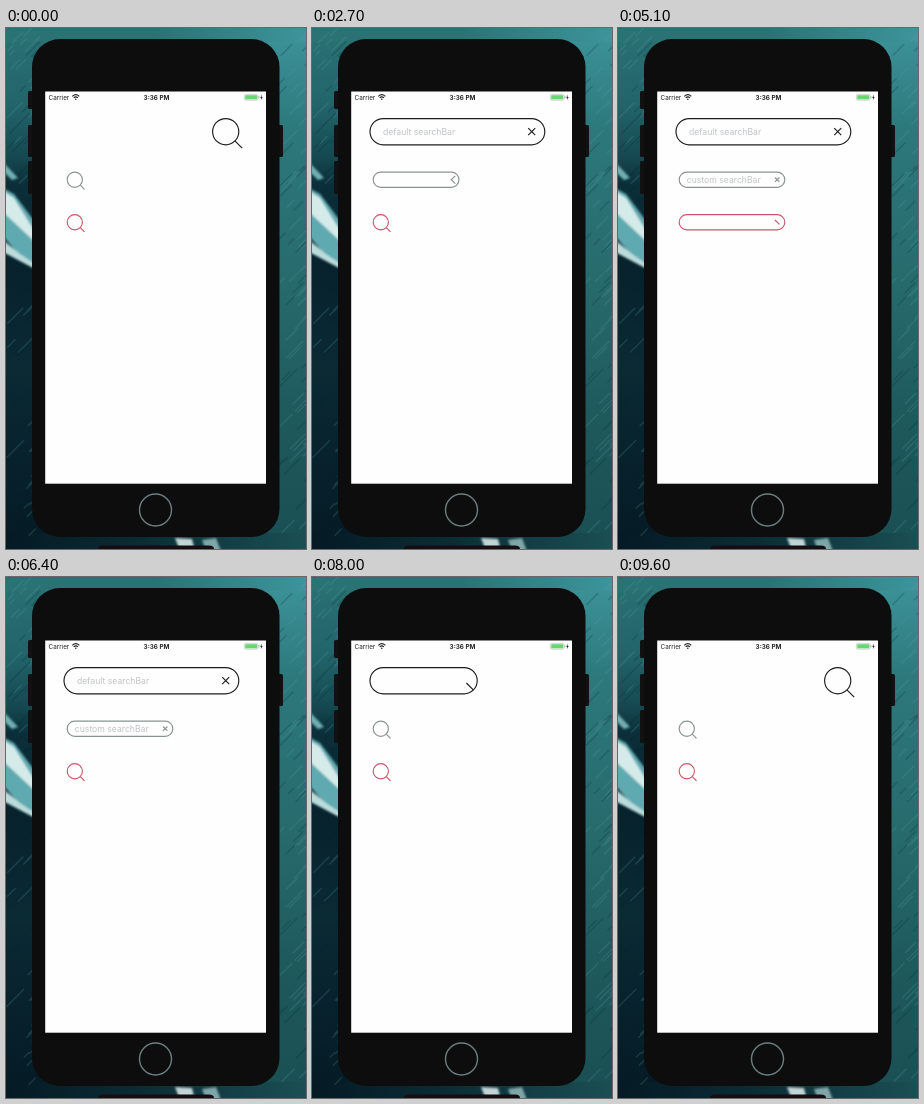
These frames come from a looping animation (300x521 px, 9.7 s). An HTML page:

```html
<!DOCTYPE html>
<html lang="en">
<head>
<meta charset="utf-8">
<title>Expanding search bars</title>
<style>
  html, body { margin: 0; width: 100%; height: 100%; overflow: hidden; background: #0d0d0d; }
  svg { display: block; width: 300px; height: 521px; }
  text { font-family: Inter, "Liberation Sans", sans-serif; }
  .status { font-size: 6.3px; fill: #222; }
  .hint { font-size: 8.65px; fill: #bfc2c5; }
</style>
</head>
<body>
<svg id="stage" viewBox="0 0 300 521">
  <defs>
    <linearGradient id="left" x2="0" y2="1">
      <stop offset="0" stop-color="#2a7274"/>
      <stop offset=".15" stop-color="#22646a"/>
      <stop offset=".25" stop-color="#154850"/>
      <stop offset=".3" stop-color="#0b2f3a"/>
      <stop offset=".46" stop-color="#07222d"/>
      <stop offset=".65" stop-color="#0a2a34"/>
      <stop offset="1" stop-color="#051a25"/>
    </linearGradient>
    <linearGradient id="right" x2="0" y2="1">
      <stop offset="0" stop-color="#3d949b"/>
      <stop offset=".2" stop-color="#2c787b"/>
      <stop offset=".5" stop-color="#276a6c"/>
      <stop offset=".75" stop-color="#1e595c"/>
      <stop offset="1" stop-color="#1a4f54"/>
    </linearGradient>
    <linearGradient id="top">
      <stop offset="0" stop-color="#2a7274"/>
      <stop offset=".5" stop-color="#2a7375"/>
      <stop offset="1" stop-color="#3d949b"/>
    </linearGradient>
    <linearGradient id="bottom">
      <stop offset="0" stop-color="#051a25"/>
      <stop offset=".45" stop-color="#0b2c35"/>
      <stop offset="1" stop-color="#1a4f54"/>
    </linearGradient>
    <filter id="soft"><feGaussianBlur stdDeviation="1.2"/></filter>
  </defs>

  <rect width="150" height="521" fill="url(#left)"/>
  <rect x="150" width="150" height="521" fill="url(#right)"/>
  <rect width="300" height="14" fill="url(#top)"/>
  <rect y="505" width="300" height="16" fill="url(#bottom)"/>
  <g id="streaks" stroke-width="1.4" opacity=".22"></g>
  <g filter="url(#soft)">
    <path d="M-3 134L12 150L6 152L-3 143Z" fill="#6fb0b4"/>
    <path d="M-3 160L8 166L29 194V240L14 228L-3 208Z" fill="#5fa9b0"/>
    <path d="M-3 163L8 170L29 204V214L-3 184Z" fill="#d5ebea"/>
    <path d="M-3 212L14 226L29 236V241L-3 224Z" fill="#bcdcdc"/>
    <path d="M169 510L186 511L189 523H174Z" fill="#c2d4d5"/>
    <path d="M196 512L210 510L215 523H200Z" fill="#7fa5a8"/>
  </g>
  <path d="M92 521Q92 517.5 97 517.5H203Q208 517.5 208 521Z" fill="#150d10"/>

  <g fill="#111">
    <rect x="22" y="63" width="6" height="18" rx="1.5"/>
    <rect x="22" y="97" width="6" height="32" rx="1.5"/>
    <rect x="22" y="133" width="6" height="33" rx="1.5"/>
    <rect x="271" y="97" width="6" height="32" rx="1.5"/>
  </g>
  <rect x="26" y="11" width="247.5" height="498" rx="28" fill="#0d0d0d"/>
  <rect x="39.2" y="63.5" width="220.8" height="392.2" fill="#fefefe"/>
  <circle cx="149.5" cy="482" r="16" fill="none" stroke="#6c7f80" stroke-width="1.4"/>

  <text class="status" x="42.6" y="71.6">Carrier</text>
  <g fill="none" stroke="#222" stroke-width="1.1">
    <path d="M66.3 68.3Q69.8 65 73.3 68.3"/>
    <path d="M67.7 69.9Q69.8 67.9 71.9 69.9"/>
  </g>
  <circle cx="69.8" cy="71.2" r=".8" fill="#222"/>
  <text class="status" x="150.5" y="71.6" text-anchor="middle" font-weight="700">3:36 PM</text>
  <rect x="238.4" y="66.4" width="13.6" height="5.8" rx="1.4" fill="#eef6ee" stroke="#b4bdb4" stroke-width=".6"/>
  <rect x="239.3" y="67.3" width="11.8" height="4" rx=".6" fill="#62d86f"/>
  <path d="M252.9 68.2V70.4" stroke="#999" stroke-width=".8"/>
  <path d="M256 66.5L254.2 69.7H255.3L254.8 72.2L256.7 68.9H255.5Z" fill="#222"/>
</svg>
<script>
const LOOP = 9700;
const NS = "http://www.w3.org/2000/svg";
const stage = document.getElementById("stage");

const ramp = (t, start, length) => Math.min(1, Math.max(0, (t - start) / length));
const ease = p => p * p * (3 - 2 * p);
const mix = (a, b, p) => a + (b - a) * p;

function add(parent, tag, attrs) {
  const node = document.createElementNS(NS, tag);
  set(node, attrs);
  return parent.appendChild(node);
}
function set(node, attrs) {
  for (const key in attrs) node.setAttribute(key, attrs[key]);
}

// Diagonal light and dark water streaks
let seed = 7;
const random = () => (seed = seed * 16807 % 2147483647) / 2147483647;
const streaks = document.getElementById("streaks");
for (let i = 0; i < 160; i++) {
  const x = i % 2 ? 270 + random() * 30 : random() * 28;
  const y = random() * 521;
  const size = 5 + random() * 14;
  add(streaks, "path", {
    d: `M${x} ${y}l${size} ${-size}`,
    stroke: random() < 0.5 ? "#04222b" : "#5aa3a6"
  });
}

// near / far: handle ends, measured from the centre of the right cap
const bars = [
  { x: 58, y: 103.7, r: 13.1, width: 174.8, near: 9.2, far: 16.5, cross: 3.5, line: 1.15,
    color: "#1c1c1e", label: "default searchBar", textX: 71, home: 148.6, open: 600, close: 7800 },
  { x: 61.2, y: 151.7, r: 7.6, width: 105.6, near: 5.5, far: 9.7, cross: 2.2, line: 1.15,
    color: "#8b9293", label: "custom searchBar", textX: 68.8, home: 0, open: 2450, close: 6500 },
  { x: 61.2, y: 194.2, r: 7.6, width: 105.6, near: 5.5, far: 9.7, cross: 2.2, line: 1.15,
    color: "#cb5568", label: "custom searchBar", textX: 68.8, home: 0, open: 3800, close: 5000 }
];

for (const b of bars) {
  b.group = add(stage, "g", { fill: "none", stroke: b.color, "stroke-width": b.line });
  b.pill = add(b.group, "rect", { x: b.x, y: b.y - b.r, height: 2 * b.r, rx: b.r });
  b.handle = add(b.group, "path", {});
  b.second = add(b.group, "path", {});
  b.text = add(stage, "text", { class: "hint", x: b.textX, y: b.y + 3 });
  b.text.textContent = b.label;
}

function drawBar(b, t) {
  const closing = t >= b.close;
  const p = closing
    ? 1 - ease(ramp(t, b.close + 100, 215))
    : ease(ramp(t, b.open, 360));
  const width = mix(2 * b.r, b.width, p);
  const cx = b.x + width - b.r;
  const near = mix(b.near, -b.cross, p);
  const far = mix(b.far, b.cross, p);
  const away = closing
    ? ease(ramp(t, b.close + 400, 300))
    : 1 - ease(ramp(t, b.open - 300, 300));

  set(b.group, { transform: `translate(${b.home * away} 0)` });
  set(b.pill, { width });
  set(b.handle, { d: `M${cx + near} ${b.y + near}L${cx + far} ${b.y + far}` });

  const shown = closing ? 1 - ramp(t, b.close, 100) : ramp(p, 0.3, 0.4);
  const end = mix(near, far, shown);
  set(b.second, { d: `M${cx + near} ${b.y - near}L${cx + end} ${b.y - end}`, opacity: shown });
  set(b.text, { opacity: closing ? 1 - ramp(t, b.close, 80) : ramp(t, b.open + 320, 160) });
}

function frame(now) {
  const t = now % LOOP;
  for (const b of bars) drawBar(b, t);
  requestAnimationFrame(frame);
}
frame(0);
</script>
</body>
</html>
```
